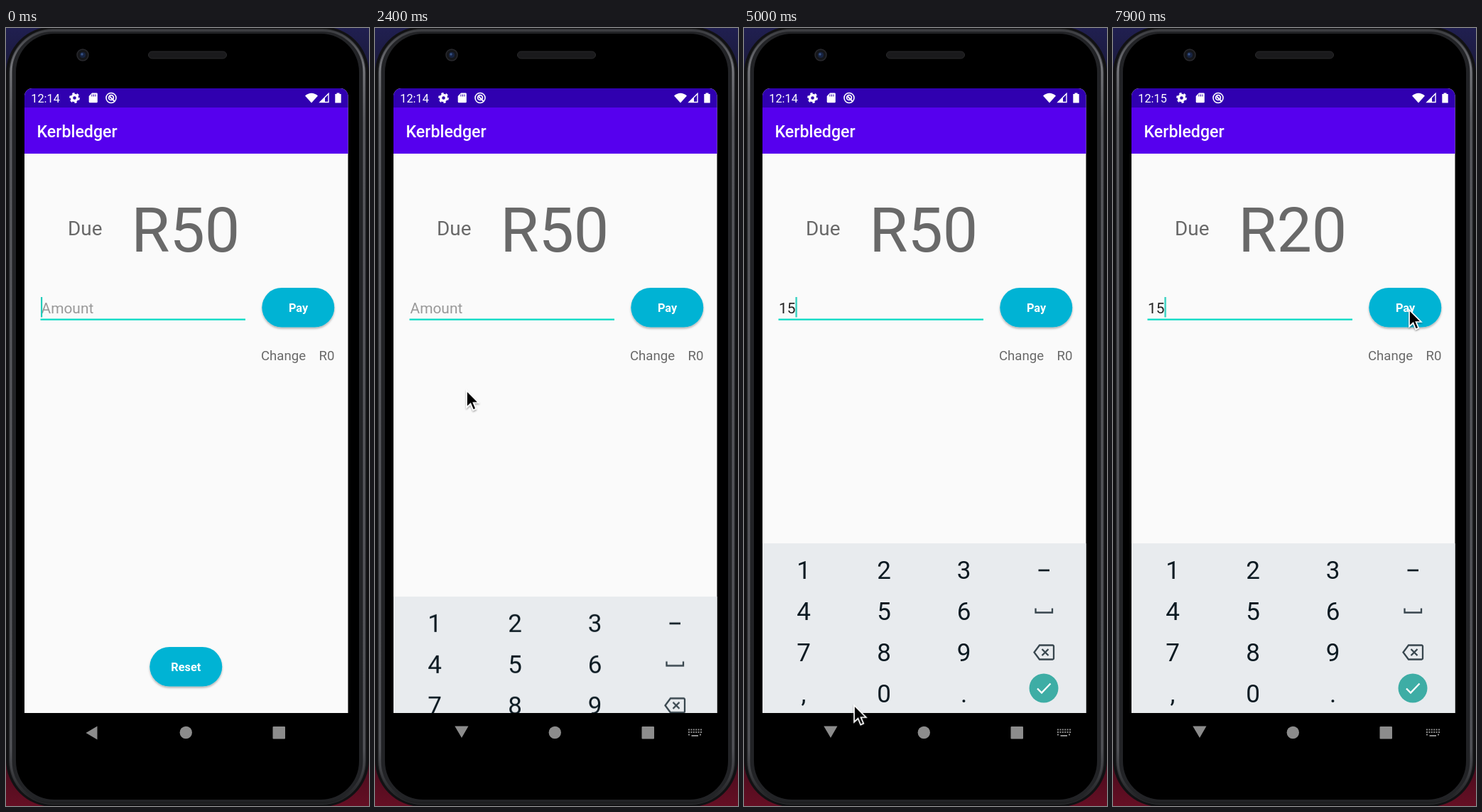
Write an HTML page that moves like this. It is 511 by 1096 pixels and loops after 8000 ms.

```html
<!DOCTYPE html>
<html lang="en">
<head>
<meta charset="utf-8">
<title>Kerbledger</title>
<style>
html, body { margin: 0; width: 100%; height: 100%; overflow: hidden; background: #16161c; }
svg { display: block; width: 511px; height: 1096px; font-family: Roboto, Arial, sans-serif; }
.bold { font-weight: 700; font-size: 16.3px; fill: #fff; text-anchor: middle; }
.grey { fill: #696969; }
.field { font-size: 20.9px; fill: #222; }
.hint { fill: #999; }
.keys { font-size: 35px; fill: #0c1a22; text-anchor: middle; }

/* Hard switches */
.cut { animation: 8s step-end infinite; }
.empty { animation-name: empty; }
.one { animation-name: one; }
.two { animation-name: two; }
.navClosed { animation-name: navClosed; }
.navOpen { animation-name: navOpen; }
.clockA { animation-name: clockA; }
.clockB { animation-name: clockB; }
.due50 { animation-name: due50; }
.due35 { animation-name: due35; }
.due20 { animation-name: due20; }
.caret { animation-name: blink, shift; }
@keyframes empty { 0% { opacity: 1 } 44.375%, 100% { opacity: 0 } }
@keyframes one { 0% { opacity: 0 } 44.375% { opacity: 1 } 56.875%, 100% { opacity: 0 } }
@keyframes two { 0% { opacity: 0 } 56.875%, 100% { opacity: 1 } }
@keyframes navClosed { 0% { opacity: 1 } 28.75%, 100% { opacity: 0 } }
@keyframes navOpen { 0% { opacity: 0 } 28.75%, 100% { opacity: 1 } }
@keyframes clockA { 0% { opacity: 1 } 70%, 100% { opacity: 0 } }
@keyframes clockB { 0% { opacity: 0 } 70%, 100% { opacity: 1 } }
@keyframes due50 { 0% { opacity: 1 } 88.75%, 100% { opacity: 0 } }
@keyframes due35 { 0% { opacity: 0 } 88.75% { opacity: 1 } 95%, 100% { opacity: 0 } }
@keyframes due20 { 0% { opacity: 0 } 95%, 100% { opacity: 1 } }
@keyframes blink {
  0%, 8.75%, 21.25%, 33.75%, 44.375%, 56.875%, 69.375%, 81.875%, 94.375%, 100% { opacity: 1 }
  2.5%, 15%, 27.5%, 40%, 50.625%, 63.125%, 75.625%, 88.125% { opacity: 0 }
}
@keyframes shift {
  0% { transform: none }
  44.375% { transform: translateX(11.7px) }
  56.875%, 100% { transform: translateX(23.5px) }
}

/* Smooth motion */
.keyboard { animation: rise 8s infinite; }
@keyframes rise {
  0%, 28.125% { transform: translateY(240px); animation-timing-function: ease-out }
  31.875%, 100% { transform: none }
}
.pointer { animation: roam 8s ease-in-out infinite; }
@keyframes roam {
  0%, 13% { transform: translate(-30px, 470px) }
  21.25%, 26.5% { transform: translate(116px, 385px) }
  36.25% { transform: translate(164px, 850px) }
  42.5%, 44.5% { transform: translate(92px, 774px) }
  47.5% { transform: translate(102px, 786px) }
  55%, 57% { transform: translate(196px, 826px); animation-timing-function: ease-in }
  62.5% { transform: translate(155px, 954px); animation-timing-function: ease-out }
  70.5% { transform: translate(158px, 1022px) }
  78.75% { transform: translate(258px, 596px) }
  87%, 100% { transform: translate(417px, 397px) }
}
</style>
</head>
<body>
<svg viewBox="0 0 511 1096">
  <defs>
    <linearGradient id="back" x2="0" y2="1">
      <stop offset="0" stop-color="#201f50"/>
      <stop offset=".1" stop-color="#17172a"/>
      <stop offset=".9" stop-color="#1c1219"/>
      <stop offset=".97" stop-color="#560d20"/>
      <stop offset="1" stop-color="#650f24"/>
    </linearGradient>
    <linearGradient id="rim" x2="0" y2="1">
      <stop offset="0" stop-color="#3c3d41"/>
      <stop offset=".05" stop-color="#77787d"/>
      <stop offset=".12" stop-color="#5a5b60"/>
      <stop offset=".93" stop-color="#54555a"/>
      <stop offset="1" stop-color="#1d1e20"/>
    </linearGradient>
    <clipPath id="screen"><path d="M26 965V96a11 11 0 0 1 11-11H470.500a11 11 0 0 1 11 11V965Z"/></clipPath>
    <filter id="lift" x="-20%" y="-20%" width="140%" height="150%">
      <feDropShadow dx="0" dy="2" stdDeviation="1.5" flood-opacity=".3"/>
    </filter>
    <filter id="soft" x="-50%" y="-50%" width="200%" height="200%">
      <feDropShadow dx="0" dy="1.5" stdDeviation="1.2" flood-opacity=".4"/>
    </filter>
  </defs>

  <!-- Phone body -->
  <rect width="511" height="1096" fill="url(#back)"/>
  <rect x="0" y="-2" width="511" height="1099" rx="66" fill="#111113"/>
  <rect x="4" y="1" width="503" height="1093" rx="62" fill="#2b2c2f"/>
  <rect x="7" y="3.500" width="497" height="1088" rx="59" fill="#222326" stroke="url(#rim)" stroke-width="3"/>
  <rect x="14" y="8" width="483" height="1079" rx="54" fill="#000"/>
  <circle cx="108" cy="38" r="8" fill="#15161a" stroke="#29292d" stroke-width="1.5"/>
  <circle cx="108" cy="38" r="4" fill="#172340"/>
  <circle cx="107" cy="37" r="1.7" fill="#385487"/>
  <rect x="200.500" y="33" width="110" height="10" rx="5" fill="#1a1a1c" stroke="#29292b"/>

  <g clip-path="url(#screen)">
    <rect x="26" y="85" width="456" height="880" fill="#fafafa"/>
    <rect x="26" y="85" width="456" height="27" fill="#3000b0"/>
    <rect x="26" y="112" width="456" height="65" fill="#5600ee"/>

    <!-- Status bar -->
    <g fill="#fff">
      <g font-size="16.3">
        <text class="cut clockA" x="35.300" y="104.500">12:14</text>
        <text class="cut clockB" x="35.300" y="104.500">12:15</text>
      </g>
      <g fill="none" stroke="#fff">
        <circle cx="96.500" cy="98.500" r="4" stroke-width="3.400"/>
        <circle cx="96.500" cy="98.500" r="6.200" stroke-width="2.400" pathLength="12" stroke-dasharray="1 1"/>
        <circle cx="148" cy="98.500" r="7" stroke-width="1.600"/>
        <circle cx="148" cy="98" r="3.400" stroke-width="1.700"/>
        <path d="M145.500 96l7.500 7.500" stroke-width="1.800"/>
      </g>
      <path d="M121 91.500h6.500a1.300 1.300 0 0 1 1.300 1.300V104a1.300 1.300 0 0 1-1.300 1.300H118a1.300 1.300 0 0 1-1.300-1.300V96Z"/>
      <path d="M121 93.500v3m2.500-3v3m2.500-3v3" stroke="#3000b0"/>
      <path d="M421 95.500Q430 88 439 95.500L430 105.500Z"/>
      <path d="M454 92.500V104.500H442Z" fill="none" stroke="#fff" stroke-width="1.400"/>
      <path d="M449 98V104.500H442Z"/>
      <path d="M465.500 91.500h4v1.500h2.200V105.500h-8.400V93h2.200Z"/>
    </g>
    <text x="43.500" y="154" font-size="23.2" font-weight="500" fill="#fff">Kerbledger</text>

    <!-- Payment form -->
    <text class="grey" x="87" y="291.500" font-size="27.900">Due</text>
    <g class="grey" font-size="88">
      <text class="cut due50" x="176.200" y="315">R50</text>
      <text class="cut due35" x="176.200" y="315">R35</text>
      <text class="cut due20" x="176.200" y="315">R20</text>
    </g>
    <g class="field">
      <text class="cut empty hint" x="49.500" y="401.500">Amount</text>
      <text class="cut one" x="49" y="401.500">1</text>
      <text class="cut two" x="49" y="401.500">15</text>
    </g>
    <rect x="48.500" y="409.500" width="288.500" height="2.300" fill="#0bdac4"/>
    <rect class="cut caret" x="49" y="379" width="2.200" height="28.500" fill="#22cdbb"/>
    <g fill="#00b3d4" filter="url(#lift)">
      <rect x="360.300" y="366" width="102" height="55.500" rx="27.750"/>
      <rect x="202.300" y="872" width="102" height="55.500" rx="27.750"/>
    </g>
    <text class="bold" x="411.500" y="400.300">Pay</text>
    <text class="bold" x="253.300" y="906.300">Reset</text>
    <g class="grey" font-size="18.600">
      <text x="359" y="467.500">Change</text>
      <text x="440.500" y="467.500">R0</text>
    </g>

    <!-- Number pad -->
    <g class="keyboard">
      <rect x="26" y="726" width="456" height="240" fill="#e8ebee"/>
      <g class="keys">
        <text y="776"><tspan x="84">1</tspan><tspan x="197">2</tspan><tspan x="309.500">3</tspan></text>
        <text y="834"><tspan x="84">4</tspan><tspan x="197">5</tspan><tspan x="309.500">6</tspan></text>
        <text y="892"><tspan x="84">7</tspan><tspan x="197">8</tspan><tspan x="309.500">9</tspan></text>
        <text y="949.500"><tspan x="84">,</tspan><tspan x="197">0</tspan><tspan x="309.500">.</tspan></text>
      </g>
      <g fill="none" stroke="#38464e" stroke-width="2.300">
        <path d="M414.500 764h15.500" stroke="#0c1a22" stroke-width="2.700"/>
        <path d="M410.500 817.500v6h23.500v-6"/>
        <path d="M416 869.500h18.500a1.500 1.500 0 0 1 1.500 1.500v17a1.500 1.500 0 0 1-1.500 1.500H416l-7.500-10ZM419.500 875l9 9m0-9l-9 9"/>
      </g>
      <circle cx="422" cy="930" r="20.500" fill="#3eada5"/>
      <path d="M413 930.500l6 6 12.500-13" fill="none" stroke="#fff" stroke-width="2.300"/>
    </g>
  </g>

  <!-- Navigation -->
  <g fill="#8c8c8c">
    <path class="cut navClosed" d="M112.500 993L128.500 983.500V1002.500Z"/>
    <circle cx="253.300" cy="992.500" r="8.700"/>
    <rect x="375.500" y="984" width="17.500" height="17.500" rx="1"/>
    <g class="cut navOpen">
      <path d="M112.300 983.500H131.500L122 1000Z"/>
      <path d="M441 988.500H460M441 992H460M441 995.500H444M457 995.500H460" fill="none" stroke="#8c8c8c" stroke-width="2" stroke-dasharray="2 1.400"/>
      <path d="M445.500 997h9.500" stroke="#8c8c8c" stroke-width="2"/>
    </g>
  </g>

  <g class="pointer">
    <path d="M0 0V23.500L5.500 18.500 9.200 27.300 13.200 25.600 9.500 17H16.800Z" stroke="#fff" stroke-width="1.700" filter="url(#soft)"/>
  </g>
</svg>
</body>
</html>
```
